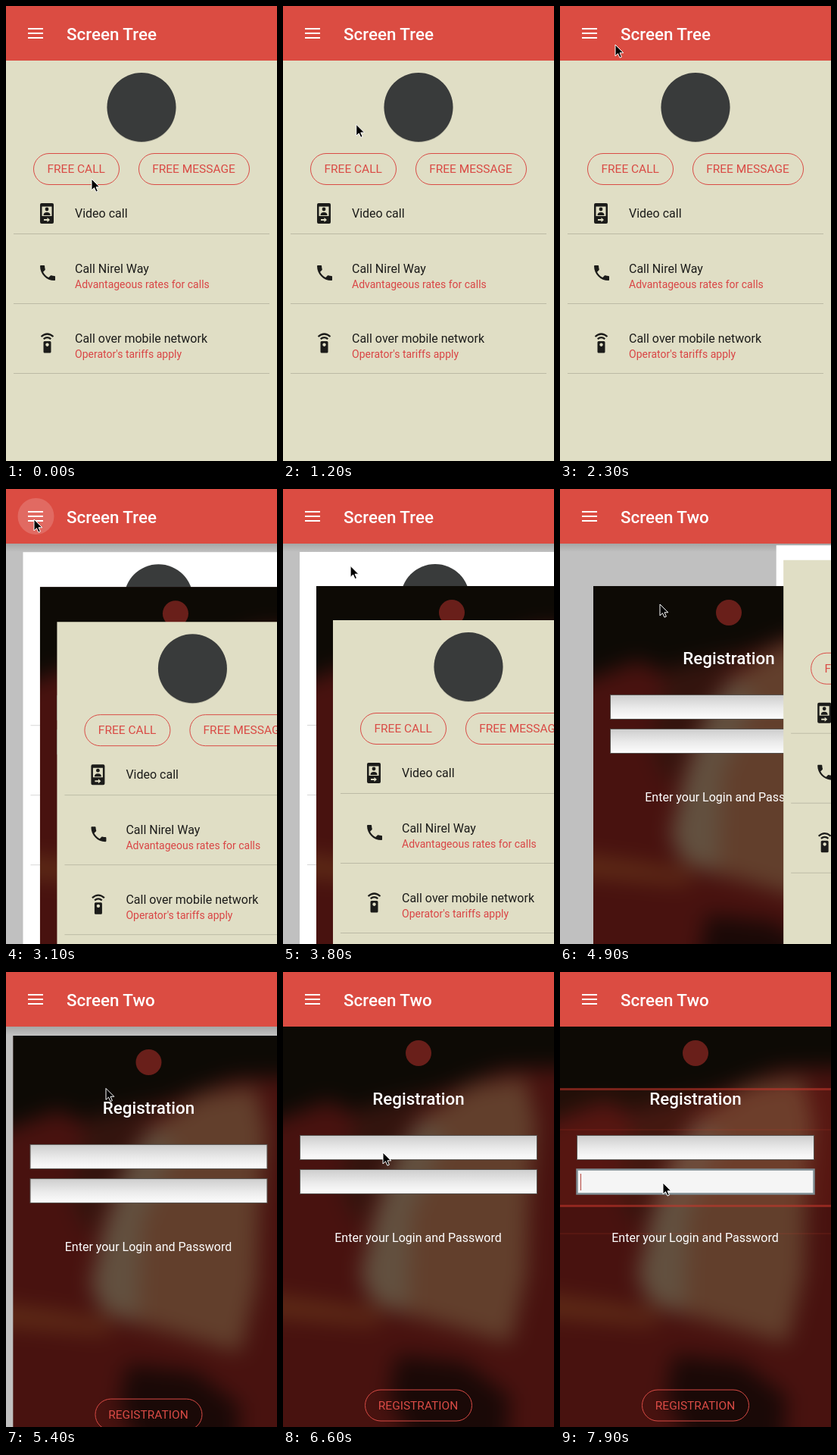
These frames come from a looping animation (358 px wide and 600 px high, 8000 ms). An HTML page:

```html
<!DOCTYPE html>
<html lang="en">
<head>
<meta charset="utf-8">
<title>Screen stack</title>
<style>
html, body { margin: 0; width: 100%; height: 100%; overflow: hidden; background: #c0c0c0; }
svg { display: block; width: 358px; height: 600px; font-family: Roboto, sans-serif; font-size: 16px; }
.title { font-size: 22.4px; font-weight: 500; fill: #fff; }
.label { font-size: 15.5px; text-anchor: middle; fill: #d94b45; }
.sub { font-size: 14px; fill: #d94545; }
.ink { fill: #1c1c1a; }
.pill { fill: none; stroke: #d94b45; }
.mid { text-anchor: middle; }
</style>
</head>
<body>
<svg viewBox="0 0 358 600">
  <defs>
    <linearGradient id="shade" x2="0" y2="1">
      <stop stop-color="#000" stop-opacity=".14"/><stop offset="1" stop-color="#000" stop-opacity="0"/>
    </linearGradient>
    <linearGradient id="input" x2="0" y2="1">
      <stop stop-color="#cdcdcd"/><stop offset=".55" stop-color="#ebebeb"/><stop offset="1" stop-color="#fdfdfd"/>
    </linearGradient>
    <filter id="blur" filterUnits="userSpaceOnUse" x="-60" y="0" width="480" height="680" color-interpolation-filters="sRGB">
      <feGaussianBlur stdDeviation="14"/>
    </filter>
    <clipPath id="page"><path d="M0 72H358V600H0Z"/></clipPath>
    <g id="contacts">
      <circle cx="179" cy="134.5" r="45.5" opacity=".18"/>
      <circle cx="179" cy="133.5" r="45.5" fill="#393b3b"/>
      <rect class="pill" x="36.5" y="194.5" width="113" height="41" rx="20.5"/>
      <text class="label" x="92.7" y="220">FREE CALL</text>
      <rect class="pill" x="175.5" y="194.5" width="146" height="41" rx="20.5"/>
      <text class="label" x="248" y="220">FREE MESSAGE</text>
      <path d="M10 300.5H348M10 392.5H348M10 484.5H348" stroke="#000" stroke-opacity=".16"/>
      <g class="ink">
        <path fill-rule="evenodd" d="M47 260h14q2 0 2 2v23q0 2-2 2h-14q-2 0-2-2v-23q0-2 2-2zM47.5 264.5v12.5h13v-12.5zM50 281v2h4.5v2l3.5-3-3.5-3v2z"/>
        <circle cx="54" cy="268" r="2.4"/>
        <path d="M49.5 276q0-4 4.500-4t4.500 4z"/>
        <path transform="translate(41.7 338.7) scale(1.11)" d="M6.62 10.79c1.44 2.83 3.76 5.14 6.59 6.59l2.2-2.2c.27-.27.67-.36 1.02-.24 1.12.37 2.33.57 3.57.57.55 0 1 .45 1 1V20c0 .55-.45 1-1 1-9.39 0-17-7.61-17-17 0-.55.45-1 1-1h3.5c.55 0 1 .45 1 1 0 1.25.2 2.45.57 3.57.11.35.03.74-.25 1.02z"/>
        <path fill-rule="evenodd" d="M51 442h7q1.5 0 1.5 1.5v12.5q0 1.5-1.5 1.5h-7q-1.5 0-1.5-1.5v-12.5q0-1.5 1.5-1.5zM54.5 444.5a2.2 2.2 0 1 0 .01 0z"/>
        <path fill="none" stroke="#1c1c1a" stroke-width="2.2" d="M46.5 436q8-7 16 0M49.7 439.2q4.8-4 9.6 0"/>
        <text x="91" y="279">Video call</text>
        <text x="91" y="352">Call Nirel Way</text>
        <text x="91" y="444">Call over mobile network</text>
      </g>
      <text class="sub" x="91" y="372">Advantageous rates for calls</text>
      <text class="sub" x="91" y="464">Operator's tariffs apply</text>
    </g>
  </defs>

  <path d="M0 0H358V600H0Z" fill="#c0c0c0"/>
  <path d="M0 72H358V83H0Z" fill="url(#shade)"/>

  <g id="one"><path d="M0 72H358V600H0Z" fill="#fff"/><use href="#contacts"/></g>

  <g id="two">
    <g clip-path="url(#page)">
      <path d="M0 72H358V600H0Z" fill="#3c110d"/>
      <g filter="url(#blur)">
        <path d="M-60 0H420V680H-60Z" fill="#48120f"/>
        <path d="M-60 0H420V125L290 128 190 165 120 200 60 170-60 215Z" fill="#0d0a05"/>
        <path d="M100 180L190 160 130 270 100 340 75 280Z" fill="#33140e"/>
        <path d="M250 150L320 140 335 200 325 300 322 400 300 490 215 465 120 440 102 400 122 320 155 235 195 185Z" fill="#623f2c"/>
        <path d="M185 190L215 220 170 320 165 450 115 430 104 400 122 320 150 240Z" fill="#62503f"/>
        <path d="M-40 425L60 438 130 450 125 465 50 458-40 450Z" fill="#633018"/>
        <path d="M150 505L240 515 300 560 290 680H200L140 560Z" fill="#1a0907"/>
      </g>
    </g>
    <g id="bands" fill="#c8382c">
      <path d="M0 155H358V308H0Z" opacity=".11"/>
      <path d="M0 153H358V156H0ZM0 307H358V310H0Z" opacity=".55"/>
      <path d="M0 207H358V209H0ZM0 344H358V346H0Z" opacity=".12"/>
    </g>
    <circle cx="179" cy="107" r="17" fill="#691f1a"/>
    <text class="title mid" x="179" y="175">Registration</text>
    <rect x="22.5" y="215.5" width="313" height="32" fill="url(#input)" stroke="#55504c"/>
    <rect id="field" x="22.5" y="260.5" width="313" height="32"/>
    <path id="caret" d="M27.5 266V288" stroke="#b5453e"/>
    <text class="mid" x="178.5" y="356" fill="#fff">Enter your Login and Password</text>
    <rect class="pill" x="108.5" y="551" width="141" height="41" rx="20.5"/>
    <text class="label" x="178.5" y="577">REGISTRATION</text>
  </g>

  <g id="three"><path d="M0 72H358V600H0Z" fill="#e0dec5"/><use href="#contacts"/></g>

  <path d="M0 0H358V72H0Z" fill="#db4c42"/>
  <circle id="ripple" cx="39.5" cy="36" fill="#fff"/>
  <path d="M29 29h20v2h-20zM29 35h20v2h-20zM29 41h20v2h-20z" fill="#fff"/>
  <text id="title" class="title" x="80" y="45"></text>
  <path id="pointer" d="M0 0V15L3.5 11.7 6 17.2 8.4 16.1 6 10.8H10.8Z" stroke="#fff"/>
</svg>
<script>
const el = id => document.getElementById(id);
const LOOP = 8000, OPEN = 2795, PICK = 4565, SETTLE = 5065, FOCUS = 7600;

// pointer stops: time, x, y
const path = [
  [0, 113, 228], [300, 113, 228], [2300, 73, 51], [2700, 37, 40], [3250, 37, 40], [4300, 132, 152],
  [5300, 132, 152], [6400, 132, 238], [7000, 132, 238], [7500, 136, 278], [LOOP, 136, 278]
];

const span = (t, start, length) => Math.min(1, Math.max(0, (t - start) / length));
const ease = p => p < .5 ? 2 * p * p : 1 - 2 * (1 - p) ** 2;
const overshoot = p => 1 + (p - 1) ** 2 * (2.7 * (p - 1) + 1.7);
const mix = (a, b, p) => a + (b - a) * p;
const move = (id, x, y) => el(id).setAttribute('transform', `translate(${x.toFixed(2)} ${y.toFixed(2)})`);
const show = (id, on) => el(id).setAttribute('visibility', on ? 'visible' : 'hidden');

function draw(t) {
  const opened = overshoot(span(t, OPEN, 350));
  const away = ease(span(t, PICK, 500));
  const home = ease(span(t, SETTLE, 500));

  ['one', 'two', 'three'].forEach((id, i) => {
    const x = 22 * (i + 1) * opened, y = (11 + 45 * i) * opened;
    if (id === 'two') move(id, x * (1 - home), y * (1 - home));
    else move(id, mix(x, 358, away), y * (1 - away));
  });

  el('title').textContent = t < PICK ? 'Screen Tree' : 'Screen Two';

  const grow = span(t, OPEN, 220);
  el('ripple').setAttribute('r', mix(4, 24, grow));
  el('ripple').setAttribute('opacity', t < OPEN ? 0 : .17 * (1 - span(t, 3120, 350)));

  const focused = t >= FOCUS;
  show('bands', focused);
  show('caret', focused);
  el('field').setAttribute('fill', focused ? '#f5f5f5' : 'url(#input)');
  el('field').setAttribute('stroke', focused ? '#7d8c92' : '#55504c');
  el('field').setAttribute('stroke-width', focused ? 2.5 : 1);

  const k = path.findIndex(p => p[0] > t);
  const [t0, x0, y0] = path[k - 1], [t1, x1, y1] = path[k];
  const p = ease((t - t0) / (t1 - t0));
  move('pointer', mix(x0, x1, p), mix(y0, y1, p));
}

const begin = performance.now();
function tick() {
  draw((performance.now() - begin) % LOOP);
  requestAnimationFrame(tick);
}
tick();
</script>
</body>
</html>
```
